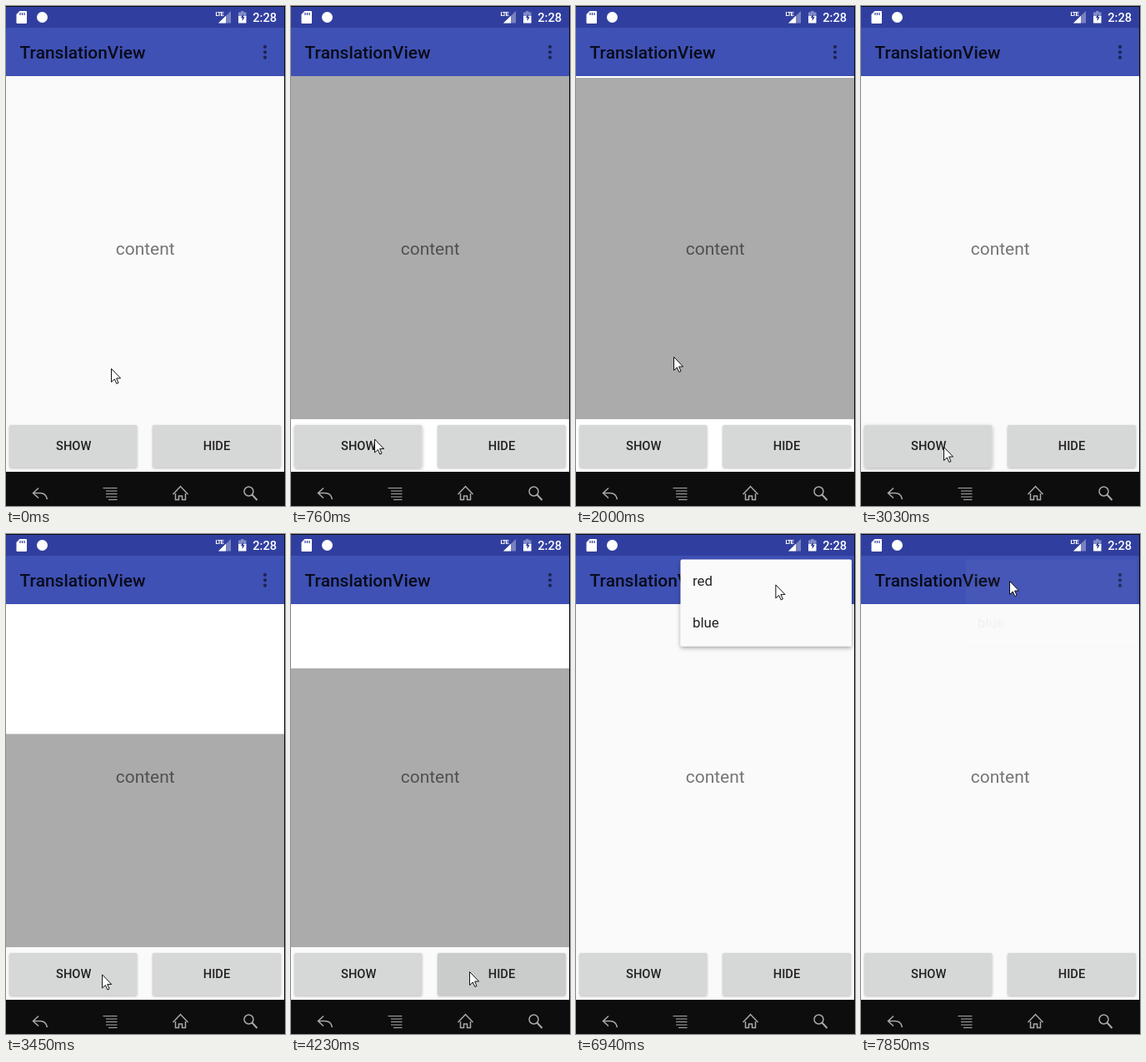
Write an HTML page that moves like this. It is 335 by 599 pixels and loops after 8 s.

```html
<!DOCTYPE html>
<html lang="en">
<head>
<meta charset="utf-8">
<title>TranslationView</title>
<style>
  html, body { margin: 0; width: 100%; height: 100%; overflow: hidden; background: #fafafa; }
  svg { display: block; width: 335px; height: 599px; font-family: Roboto, sans-serif; }
  .medium { font-weight: 500; }
  .mid { text-anchor: middle; }
</style>
</head>
<body>
<svg viewBox="0 0 335 599" xmlns="http://www.w3.org/2000/svg">
  <defs>
    <filter id="low" x="-10%" y="-20%" width="120%" height="150%">
      <feDropShadow dx="0" dy="0.8" stdDeviation="0.9" flood-opacity="0.28"/>
    </filter>
    <filter id="high" x="-10%" y="-20%" width="120%" height="150%">
      <feDropShadow dx="0" dy="1.5" stdDeviation="2" flood-opacity="0.28"/>
    </filter>
    <filter id="float" x="-10%" y="-15%" width="120%" height="140%">
      <feDropShadow dx="0" dy="2" stdDeviation="2.5" flood-opacity="0.35"/>
    </filter>
    <clipPath id="reveal"><rect id="hole"/></clipPath>
  </defs>

  <rect width="335" height="599" fill="#fafafa"/>
  <text class="mid" x="167.2" y="297.5" font-size="20.9" fill="#757575">content</text>
  <rect id="shade" y="84" width="335" height="411" opacity="0.317"/>
  <rect id="panel" y="84" width="335" height="0" fill="#fff"/>
  <rect id="band" y="495" width="335" height="63" fill="#fff"/>

  <!-- buttons -->
  <rect id="show" x="4" y="502" width="153.5" height="51" rx="2" fill="#d6d7d7"/>
  <rect id="hide" x="176" y="502" width="154" height="51" rx="2" fill="#d6d7d7"/>
  <g class="medium mid" font-size="14.65" fill="#212121">
    <text x="81.200" y="532">SHOW</text>
    <text x="253" y="532">HIDE</text>
  </g>

  <!-- app bar -->
  <rect y="26" width="335" height="58" fill="#3f51b5"/>
  <text class="medium" x="16.600" y="62.700" font-size="20.9" fill="#090b18">TranslationView</text>
  <path d="M311 48.900v0M311 55.300v0M311 61.700v0" stroke="#1d2553" stroke-width="4.200" stroke-linecap="round"/>

  <!-- status bar -->
  <rect width="335" height="26" fill="#303f9f"/>
  <g fill="#fff">
    <path d="M16.500 6H24q1 0 1 1V20q0 1-1 1H13.500q-1 0-1-1V10Z"/>
    <path d="M17 8v3M19.500 8v3M22 8v3" stroke="#303f9f" stroke-width="1.2"/>
    <circle cx="43.500" cy="13.500" r="6.500"/>
    <path d="M255 20.500L270 6V20.500Z" opacity="0.35"/>
    <path d="M255 20.500L264 11.800V20.500Z"/>
    <text x="251.500" y="12" font-size="7.500" font-weight="700" letter-spacing="-1">LTE</text>
    <path d="M279 7.500h3V6h3.500v1.500h3V13h-9.500Z" opacity="0.4"/>
    <path d="M279 12h9.500v8.500h-9.500Z"/>
    <path d="M285 9.500l-3.200 4.500h1.800V18l3.200-4.800h-1.800Z" fill="#303f9f"/>
    <text class="medium" x="296.300" y="19" font-size="14.65">2:28</text>
  </g>

  <!-- navigation bar -->
  <rect y="558" width="335" height="41" fill="#0d0d0d"/>
  <g fill="none" stroke="#a9a9a9" stroke-width="1.5">
    <path d="M39 577.500L32.500 583.500L39 589.500M33 583.500H41Q48 583.500 49.500 591"/>
    <path d="M116.500 577.500H133.500M120 581H133.500M120 584.500H133.500M120 588H133.500M123 591.500H133.500" stroke-width="1.2"/>
    <path d="M200.500 585L209.500 575.500L218.500 585M203.500 584V591.500H207.500V587H211.500V591.500H215.500V584"/>
    <circle cx="291.500" cy="581.500" r="5.500"/>
    <path d="M295.500 585.500L301.500 592" stroke-width="2"/>
  </g>

  <!-- overflow menu -->
  <g id="menu" clip-path="url(#reveal)">
    <rect x="125.500" y="30.500" width="205.500" height="104" rx="2" fill="#fafafa" filter="url(#float)"/>
    <g font-size="16.75" fill="#212121">
      <text x="140" y="61.500">red</text>
      <text x="140" y="111.800">blue</text>
    </g>
  </g>

  <path id="cursor" d="M.5 .5V16.500L4.300 13L6.800 18.500L9 17.500L6.600 12H11.600Z" fill="#fff" stroke="#111"/>
  <path d="M0 .5H335M334.500 0V558" stroke="#0b0b12"/>
</svg>
<script>
const LOOP = 8000, STEP = 120, FULL = 210;
const el = id => document.getElementById(id);
const set = (id, attrs) => {
  for (const k in attrs) el(id).setAttribute(k, attrs[k]);
};
const within = (t, a, b) => t >= a && t < b;
const lerp = (a, b, p) => a + (b - a) * p;
const smooth = p => p * p * (3 - 2 * p);

// Progress in screen refreshes: the first lands on a, the last on b.
function progress(t, a, b) {
  const shown = Math.floor((t - a) / STEP + 1) * STEP;
  return Math.min(1, Math.max(0, shown / (b - a + STEP)));
}

// Pointer strokes: first step, last step, resting point.
const strokes = [
  [120, 480, 100, 518.5],
  [1270, 1540, 117, 420],
  [2270, 2540, 174, 481],
  [2660, 2780, 99, 528],
  [3450, 3840, 214, 524],
  [4380, 4890, 116, 526],
  [5580, 5970, 322, 50],
  [6120, 6240, 310, 52],
  [6700, 7180, 201, 65],
  [7330, 7330, 178, 56]
];

function pointer(t) {
  let x = 126, y = 434;
  for (const [a, b, toX, toY] of strokes) {
    const p = smooth(progress(t, a, b));
    x = lerp(x, toX, p);
    y = lerp(y, toY, p);
  }
  return `translate(${x} ${y})`;
}

// Panel runs: opening, closing, gone, height left once closing shows.
const runs = [
  { open: 760, close: 1850, gone: 2120, left: 14 },
  { open: 3180, close: 4080, gone: 4380, left: 89 }
];

function panelHeight(t, run) {
  if (!run) return 0;
  if (t >= run.close) return run.left - 12 * Math.floor((t - run.close) / 150);
  return FULL * smooth(progress(t, run.open + STEP, run.open + 3 * STEP));
}

function drawMenu(t) {
  const shown = progress(t, 6550, 6700);
  const faded = t < 7730 ? 0 : progress(t, 7730, 7850) * 0.965;
  const left = lerp(390, 110, shown), bottom = lerp(10, 152, shown);
  set("menu", { opacity: shown * (1 - faded) });
  set("hole", { x: left, y: 22, width: Math.max(0, 335 - left), height: Math.max(0, bottom - 22) });
}

function draw(t) {
  const run = runs.find(r => within(t, r.open, r.gone));
  const pressed = within(t, 760, 1000) || within(t, 3030, 3300);
  const lift = on => `url(#${on ? "high" : "low"})`;

  set("cursor", { transform: pointer(t) });
  set("panel", { height: panelHeight(t, run) });
  set("shade", { visibility: run ? "visible" : "hidden" });
  set("band", { visibility: run === runs[0] ? "visible" : "hidden" });
  set("show", { filter: lift(pressed) });
  set("hide", {
    filter: lift(within(t, 4080, 4230)),
    fill: within(t, 4080, 4380) ? "#cacccb" : "#d6d7d7"
  });
  drawMenu(t);
}

const start = performance.now();
function tick() {
  draw((performance.now() - start) % LOOP);
  requestAnimationFrame(tick);
}
tick();
</script>
</body>
</html>
```
